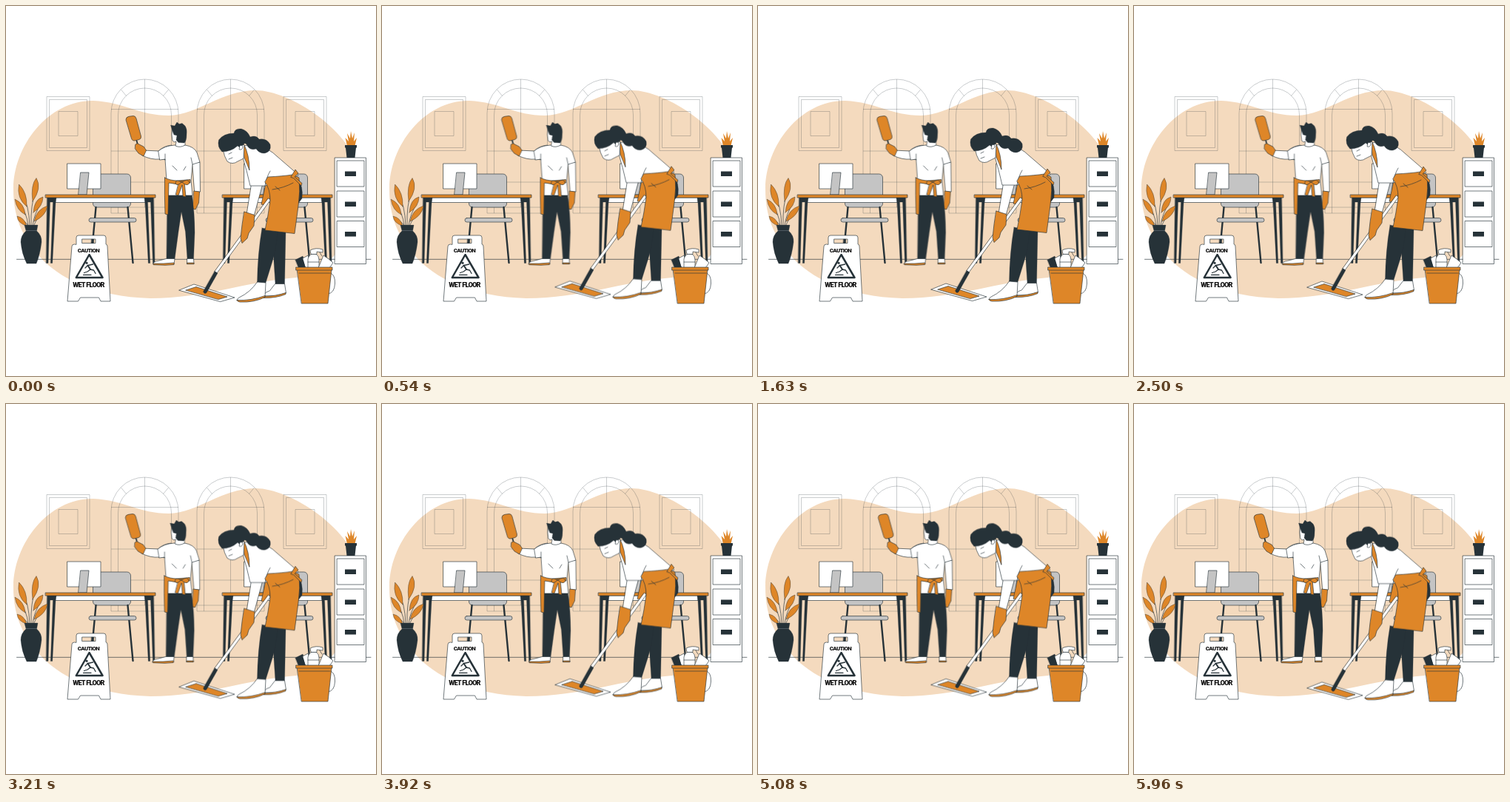
These frames come from a looping animation (500x500 px, 6000 ms). An HTML page:

```html
<!DOCTYPE html>
<html lang="en">
<head>
<meta charset="utf-8">
<title>Office cleaning</title>
<style>
  html, body { margin: 0; width: 100%; height: 100%; overflow: hidden; background: #fff; }
  svg { display: block; width: 100%; height: 100%; }
  .o { fill: #de8628; }
  .d { fill: #263238; }
  .w { fill: #fff; }
  .g { fill: #c4c4c4; }
  .n { fill: none; }
  .ink { stroke: #263238; stroke-width: .65; stroke-linejoin: round; stroke-linecap: round; }
  .ink .d { stroke-width: .3; }
  .faint { fill: none; stroke: #263238; stroke-width: .6; stroke-opacity: .42; }
  text { font-family: Roboto, "Liberation Sans", sans-serif; font-weight: 800; text-anchor: middle; fill: #111; }

  .wiper { animation: shake 6s linear infinite; }
  .mopper { animation: bob 1.5s linear infinite; }
  @keyframes shake {
    10%, 90% { transform: translateX(-.6px); }
    20%, 80% { transform: translateX(1.2px); }
    30%, 50%, 70% { transform: translateX(-2.4px); }
    40%, 60% { transform: translateX(2.4px); }
  }
  @keyframes bob {
    50% { transform: translateY(-6px); }
  }
</style>
</head>
<body>
<svg viewBox="0 0 500 500">
  <defs>
    <g id="arch" class="faint">
      <path d="M142 280V145a45.5 46 0 0 1 91 0V280ZM151.5 280V147a36 36 0 0 1 72 0V280"/>
      <path d="M187.500 99V111M155.500 113L162.500 121.500M219.500 113L212.500 121.500M142 139.500H233M142 196H233M142 238H233M142 272H233M187.500 111V272"/>
    </g>
    <g id="frame" class="faint">
      <path d="M55 122.500H113V195.500H55ZM58.500 126.500H109.500V191.500H58.500ZM71 142.500H97V175.500H71Z"/>
    </g>
    <g id="desk" class="ink">
      <rect class="g" x="117.500" y="227" width="51" height="45" rx="5"/>
      <path class="n" style="stroke-width:2.400" d="M121.500 272L114.500 347M164.500 272L171.500 347"/>
      <rect class="g" x="112" y="286.500" width="64" height="5.500" rx="2.700"/>
      <path class="w" d="M83 213H128V247H83Z"/>
      <path class="g" d="M101 225H112L109 255H98Z"/>
      <path class="w" d="M67 259H188V265.500H67Z"/>
      <path class="d" d="M55.500 259H68L67 266L62.700 347.500H60.300L63.500 265H59.500L57 347.500H54.300Z"/>
      <path class="d" d="M199.500 259H187L188 266L192.300 347.500H194.700L191.500 265H195.500L198.500 347.500H201Z"/>
      <path class="o" d="M53.500 255H202V259H53.500Z"/>
    </g>
    <g id="drawer">
      <rect class="w ink" x="447.500" y="209" width="36.500" height="35"/>
      <rect class="d" x="458" y="223.500" width="15" height="6.500"/>
    </g>
  </defs>

  <path fill="#f4dabe" d="M10 248C10 188 58 127 118 128C160 130 180 148 220 148C260 147 290 114 338 114C383 114 470 168 480 232C484 292 447 357 392 367C325 372 270 395 195 395C120 393 70 367 45 338C22 312 10 285 10 248Z"/>
  <use href="#arch"/>
  <use href="#arch" x="116"/>
  <use href="#frame"/>
  <use href="#frame" x="320"/>
  <path class="n ink" d="M14.500 342.300H493"/>
  <use href="#desk"/>
  <use href="#desk" x="239"/>

  <!-- vase -->
  <g class="ink">
    <path class="n" d="M34 297Q33 270 40 248M32 297Q31 268 22 255M30 297Q28 278 18 268M31 298Q26 290 17 287M36 297Q38 280 47 268M37 298Q42 285 50 280"/>
    <g class="o" style="stroke-width:.4">
      <path d="M36 264Q33 242 41 232.500Q49 246 36 264Z"/>
      <path d="M28 271Q14 260 17.500 241Q29 252 28 271Z"/>
      <path d="M26 282Q14 276 12 261Q25 267 26 282Z"/>
      <path d="M28 297Q16 294 15 284Q25 286 28 297Z"/>
      <path d="M37 279Q38 261 50 258Q50 271 37 279Z"/>
      <path d="M38 291Q41 275 56 270Q54 284 38 291Z"/>
    </g>
    <path class="d" d="M25 296H43L41.500 304Q48.500 310 48 319Q46 336 41 348H28Q21 334 20 319Q20 310 27 304Z"/>
    <path class="n" style="stroke:#78828a;stroke-width:.5" d="M27 303.500H41.500"/>
  </g>

  <!-- cabinet -->
  <rect class="w ink" x="444.500" y="205" width="42" height="143.500"/>
  <use href="#drawer"/>
  <use href="#drawer" y="41"/>
  <use href="#drawer" y="81.500"/>
  <path class="o" d="M461 189L458.500 178L463 183L461 172L465 179L466 169L468 179L471 171L470 183L474 178L471.500 189Z"/>
  <path class="d" d="M458 188H474V191.500H473L471.500 205H460.500L459 191.500H458Z"/>

  <!-- floor sign -->
  <g class="ink">
    <path class="w" fill-rule="evenodd" d="M95 322V313Q95 310 98 310H132Q135 310 135 313V322Q137 322 137 325L141 399H128L125.500 394H100.500L97.500 399H83L89 325Q89 322 92 322ZM103 315H121V320.500H103Z"/>
    <path class="d" d="M115.500 315H118.500V320.500H115.200Z"/>
    <path class="n" style="stroke-width:2.500" d="M112.500 336L94.800 367H130.500Z"/>
    <circle class="d" cx="109" cy="347.300" r="1.400"/>
    <path class="n" style="stroke-width:2" d="M110.500 350.500L114 356"/>
    <path class="n" style="stroke-width:1.300" d="M111 350.500L117.500 349M110 351L107 354M114 356L118.500 357L121 361.500M113.500 356.500L110 359L105.500 360.500M104.500 363.300H115"/>
  </g>
  <text x="111.500" y="332.600" font-size="7.800" letter-spacing="-.6">CAUTION</text>
  <text x="111.500" y="380" font-size="9.200" letter-spacing="-.75">WET FLOOR</text>

  <!-- bucket -->
  <g class="ink">
    <path class="n" d="M439 361Q445 364 444.500 375Q444 388 435 389"/>
    <path class="d" d="M391 343L401 338L408 353H395Z"/>
    <path class="w" d="M401 341L408 337L413 354H405Z"/>
    <path class="w" d="M408 354V342Q409 337 413 335H419Q423 338 423 343V354Z"/>
    <path class="w" d="M412 335L411 330Q419 326 428 329V333L420 332V335Z"/>
    <path class="n" d="M408 346H423M424 333L427 338"/>
    <path class="w" d="M422 354L429 337Q437 342 442 347L437 354Z"/>
    <path class="o" d="M393.500 356H440L435 402H399.500Z"/>
    <path class="o" d="M392 353H441V357H392Z"/>
    <path class="n" d="M396 361H438"/>
  </g>

  <g class="wiper ink">
    <path class="o" d="M162 153.500Q162 150 166 149.300L172 148.500Q175 148.500 176 152L182.500 176Q183 179.500 180 180.500L174 182Q170.500 182.500 169.500 179Z"/>
    <path class="n" style="stroke-width:1.800" d="M176.500 182L178.500 189"/>
    <path class="w" d="M185 195L206 196Q213 189 224 188L220 208L208 207Q196 208 184 202Z"/>
    <path class="o" d="M175 187Q178 184.500 180 187L186 190L189.500 195L186 203L179 199L174.500 193Z"/>
    <path class="w" d="M252 212L262 211L262.500 251H255Z"/>
    <path class="o" d="M254 250L261.500 251L260.500 266L256 275L252.500 274Z"/>
    <path class="d" d="M218 253H251Q255 280 255 306L253.500 342H245L242.500 305L237 278L233 305L228 342H217Z"/>
    <path class="w" d="M206 196Q214 189 228 188H242Q254 190 258 198L262 211L252 214L250 236L252 256H219L217 236L215 207L208 208Z"/>
    <path class="n" d="M250 205L252 214M215 200V208M225 216L231 222M243 217L240 222"/>
    <path class="o" d="M214.500 232Q222 236 232 236L249 234.500V239L232 241L220 239L219 282L215 281Q214 255 214.500 232Z"/>
    <path class="o" d="M234 237L241 237L243 258L239 257L238 242L233 256L229.500 255Z"/>
    <path class="o" d="M237 238Q229 233 229 240Q232 244 237 238ZM238 238Q246 232 248 239Q245 245 238 238Z"/>
    <path class="w" d="M217 341.500H228L227 349H199Q199 345 205 344.500Z"/>
    <path class="o" d="M199 348L213 348L227 347V349.500L215 350.300L199.500 349.700Z"/>
    <path class="w" d="M245 341.500H253.500L254 348.500H245Z"/>
    <path class="o" d="M245 347H254V348.700H245Z"/>
    <path class="w" d="M224.500 166L224 174L225 182Q227 185 230 183L229 189Q235 192 242 188V178L236 165Z"/>
    <path class="d" d="M225 169L222.500 161L228 162L231 157L234 159.500L238 158.500L242 162Q245 166 244 174Q244 182 241 185L233 184.500L230 181L231 175L227 174Z"/>
  </g>

  <g class="mopper ink">
    <path class="w" d="M234 384L254 376L309 394L290 399.500Z"/>
    <path class="o" d="M243 384L257 379.500L299 393L287 396.500Z"/>
    <path class="d" d="M394 232Q402 244 400 260L394 268Z"/>
    <path class="d" d="M360 300L378 304L376.500 376H364L362 345Z"/>
    <path class="d" d="M346 300L367 304Q365 330 360 345L351 374H339.500Q340 335 346 300Z"/>
    <path class="w" d="M364 375.500H376.500L378.500 388L365 391.500L348 392Q349 387 356 385Z"/>
    <path class="o" d="M348 392.500Q365 392 378 387.500V389.500Q365 395 348 394.500Z"/>
    <path class="w" d="M339.500 373L351 374L350 393Q335 400 314 399Q311 396 315 394Q330 387 339.500 373Z"/>
    <path class="o" d="M312 397.500Q331 398.500 350 391.500V393.500Q335 401 316 400Q312 399 312 397.500Z"/>

    <path class="o" d="M352 236L358 242L357 260L350 269L345 268L348 254Z"/>
    <path class="w" d="M354.500 260L357.500 262L285 361L282 359Z"/>
    <path class="d" d="M282 358.500L286 361L271 387.500Q268 390 266.500 386Z"/>

    <path class="w" d="M332 240L347 240Q341 262 335 284L325.500 281Z"/>
    <path class="w" d="M320 190Q328 186 340 189Q355 192 366 203L388 222L395 229L357 241L350 243H330Q326 225 321 208Z"/>
    <path class="n" d="M350 243Q352 231 357 223"/>
    <path class="o" d="M318 187L321 186Q329 201 329 222Q326 214 322 205Q322 196 318 187Z"/>
    <path class="o" d="M354 231Q374 230 387 228L396 232Q398 250 395 270L390 307.500L350 303Q354 285 357 263Q357 247 350 238Z"/>
    <path class="n" d="M360 248Q375 246 388 239M364 244L370 249"/>
    <path class="o" d="M385 231L391 221L395 226L390 231L400 239.500L399 243L389 233Z"/>
    <path class="o" d="M322 278L336 282.500L335 297L328 307L326 314L319 320.500L317 314L319 296Z"/>

    <path class="w" d="M293 193Q295 204 299 210Q306 215 313 210L321 206L322 188L308 183Z"/>
    <path class="n" d="M301 200L305 198M301 207L306 205"/>
    <path class="d" d="M308 172Q309 165 318 166Q326 168 330 177Q338 174 342 180Q352 178 357 187Q359 197 349 199Q342 199 338 193Q329 196 325 187Q322 184 320 188L317 192L313 189Q304 197 292 197Q285 190 287.500 181Q294 172 308 172Z"/>
    <path class="w" d="M316 189Q320 187 320 191Q319 195 315.500 194Z"/>
  </g>
</svg>
</body>
</html>
```
